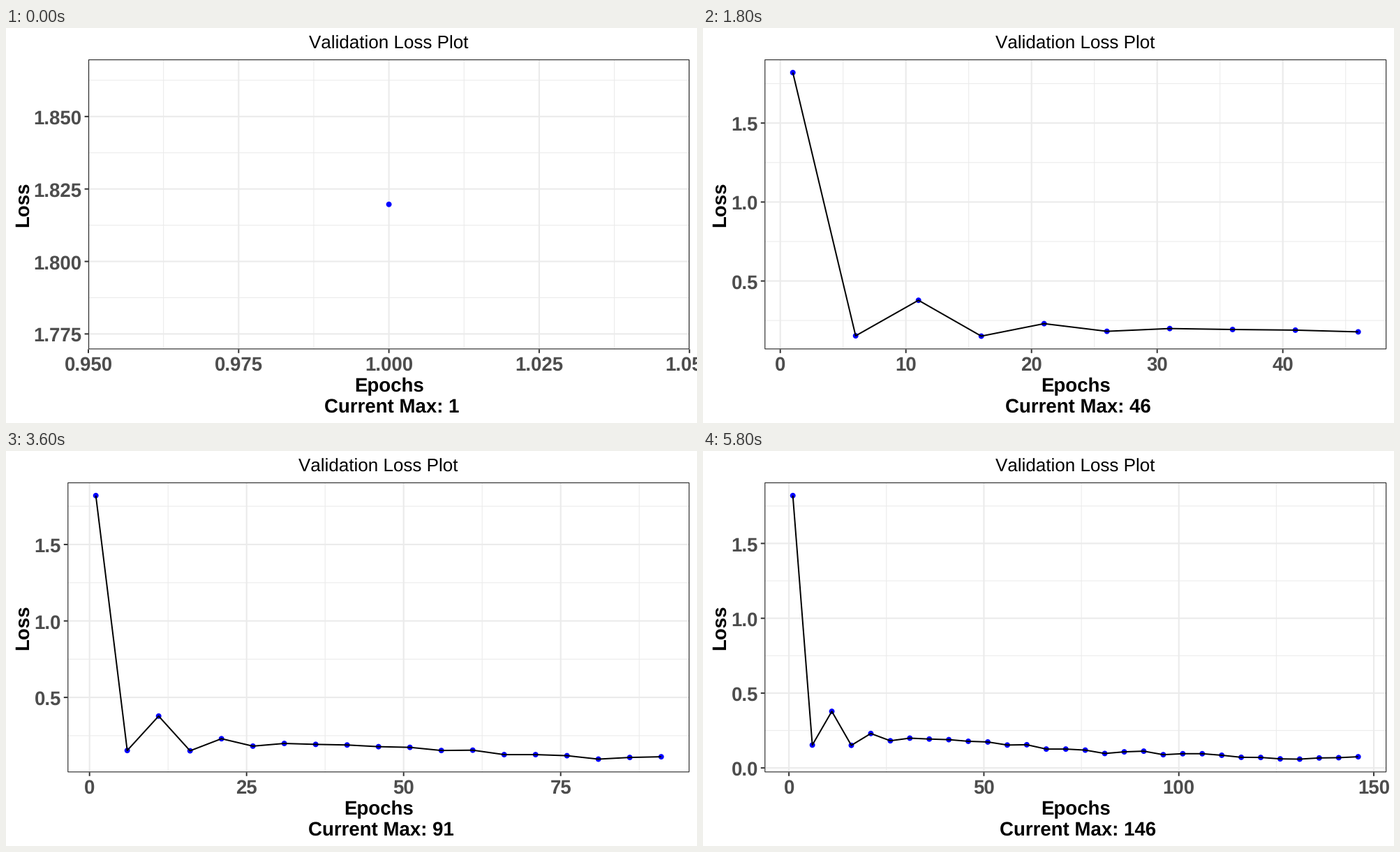
Animation, 990 px wide and 566 px high, one loop 6 s. Source, as a matplotlib script:

```python
import math
from itertools import count

import matplotlib.pyplot as plt
import numpy as np
from matplotlib.animation import FuncAnimation
from matplotlib.collections import LineCollection
from matplotlib.patches import Circle, Rectangle

W, H, DPI = 990, 566, 64
PT = 72 / DPI  # points per pixel
TOP, BOTTOM, RIGHT = 45, 460.4, 979.2
AXIS_SIZE, TITLE_SIZE, TICK = 27.6, 26, 5.4
DARK, GRID, LABEL = "#333333", "#ebebeb", "#4d4d4d"

LOSS = np.array([
    1.8197, 0.153, 0.378, 0.151, 0.230, 0.1815, 0.199, 0.193, 0.189, 0.178,
    0.1735, 0.153, 0.155, 0.126, 0.126, 0.119, 0.0965, 0.1075, 0.112, 0.0885,
    0.095, 0.095, 0.0847, 0.071, 0.070, 0.0605, 0.0588, 0.0667, 0.0685, 0.0747])
EPOCH = 1 + 5 * np.arange(len(LOSS))

# Plain, unkerned glyph advances.
plt.rcParams.update({"font.family": "Liberation Sans", "text.hinting": "no_hinting",
                     "text.kerning_factor": 6})
fig = plt.figure(figsize=(W / DPI, H / DPI), dpi=DPI, facecolor="white")
ax = fig.add_axes([0, 0, 1, 1])


def nice_ticks(lo, hi, m=5):
    """Extended Wilkinson tick search: simplicity, coverage and density."""
    steps = (1, 5, 2, 2.5, 4, 3)
    span = hi - lo
    best, ticks = -2, None

    def total(simple, cover, dense):
        return 0.25 * simple + 0.2 * cover + 0.5 * dense + 0.05

    for j in count(1):
        for i, q in enumerate(steps):
            simple_max = 2 - i / (len(steps) - 1) - j
            if total(simple_max, 1, 1) < best:
                return ticks
            for k in count(2):
                dense_max = 2 - (k - 1) / (m - 1) if k >= m else 1
                if total(simple_max, 1, dense_max) < best:
                    break
                for z in count(math.ceil(math.log10(span / (k + 1) / j / q))):
                    step = j * q * 10.0 ** z
                    width = step * (k - 1)
                    over = max(width - span, 0) / 2
                    cover_max = 1 - (over / (0.1 * span)) ** 2
                    if total(simple_max, cover_max, dense_max) < best:
                        break
                    first = math.floor(hi / step) * j - (k - 1) * j
                    last = math.ceil(lo / step) * j
                    for start in range(first, last + 1):
                        a = start * step / j
                        b = a + width
                        has_zero = start % j == 0 and a <= 0 <= b
                        simple = simple_max - (not has_zero)
                        cover = 1 - 0.5 * ((hi - b) ** 2 + (lo - a) ** 2) / (0.1 * span) ** 2
                        ratio = (k - 1) / width * (max(b, hi) - min(a, lo)) / (m - 1)
                        score = total(simple, cover, 2 - max(ratio, 1 / ratio))
                        if score > best:
                            best, ticks = score, a + step * np.arange(k)


def scale(values):
    """Padded limits, major ticks, minor ticks and tick labels."""
    lo, hi = values.min(), values.max()
    pad = 0.05 * ((hi - lo) or 1)
    lo, hi = lo - pad, hi + pad

    def inside(t):
        return t[(t > lo - 1e-9) & (t < hi + 1e-9)]

    major = inside(nice_ticks(lo, hi))
    step = major[1] - major[0]
    minor = inside(np.append(major - step / 2, major[-1] + step / 2))
    digits = next(d for d in range(9) if np.allclose(major, major.round(d), atol=1e-9))
    return (lo, hi), major, minor, [f"{abs(t):.{digits}f}" for t in major]


def lines(segments, color, width):
    ax.add_collection(LineCollection(segments, colors=color, linewidths=width * PT,
                                     capstyle="butt", snap=False))


def text(x, y, s, size=AXIS_SIZE, color="black", weight="bold", ha="center", **kw):
    ax.text(x, y, s, size=size * PT, color=color, weight=weight, ha=ha,
            va="baseline", **kw)


def draw(frame):
    ax.clear()
    ax.set(xlim=(0, W), ylim=(H, 0))
    ax.axis("off")

    epochs, loss = EPOCH[:frame + 1], LOSS[:frame + 1]
    (x0, x1), x_major, x_minor, x_labels = scale(epochs)
    (y0, y1), y_major, y_minor, y_labels = scale(loss)
    left = 118 if len(y_labels[0]) > 3 else 88.2
    mid = (left + RIGHT) / 2

    def px(v):
        return left + (v - x0) / (x1 - x0) * (RIGHT - left)

    def py(v):
        return BOTTOM - (v - y0) / (y1 - y0) * (BOTTOM - TOP)

    for xs, ys, width in ((x_minor, y_minor, 1.05), (x_major, y_major, 2.1)):
        lines([[(left, y), (RIGHT, y)] for y in py(ys)], GRID, width)
        lines([[(x, TOP), (x, BOTTOM)] for x in px(xs)], GRID, width)

    for xy in zip(px(epochs), py(loss)):
        ax.add_patch(Circle(xy, 3.95, fc="blue", lw=0, zorder=3))
    if frame:
        ax.plot(px(epochs), py(loss), color="black", lw=2 * PT,
                solid_capstyle="butt", snap=False, zorder=4)
    ax.add_patch(Rectangle((left + 0.55, TOP + 0.55), RIGHT - left - 1.1,
                           BOTTOM - TOP - 1.1, fill=False, ec=DARK, lw=1.2 * PT,
                           snap=False, zorder=5))

    lines([[(left - TICK, y), (left, y)] for y in py(y_major)], DARK, 2)
    lines([[(x, BOTTOM), (x, BOTTOM + TICK)] for x in px(x_major)], DARK, 2)
    for x, s in zip(px(x_major), x_labels):
        text(x, 491, s, color=LABEL)
    for y, s in zip(py(y_major), y_labels):
        text(left - 9.4, y + 10.8, s, color=LABEL, ha="right")

    text(mid, 30, "Validation Loss Plot", size=TITLE_SIZE, weight="normal")
    text(mid, 521.4, "Epochs")
    text(mid + 3.8, 551, f"Current Max: {epochs[-1]}")
    text(32, 252.5, "Loss", rotation=90, rotation_mode="anchor")


anim = FuncAnimation(fig, draw, frames=len(LOSS), interval=200, repeat=True,
                     repeat_delay=0)
plt.show()
```
